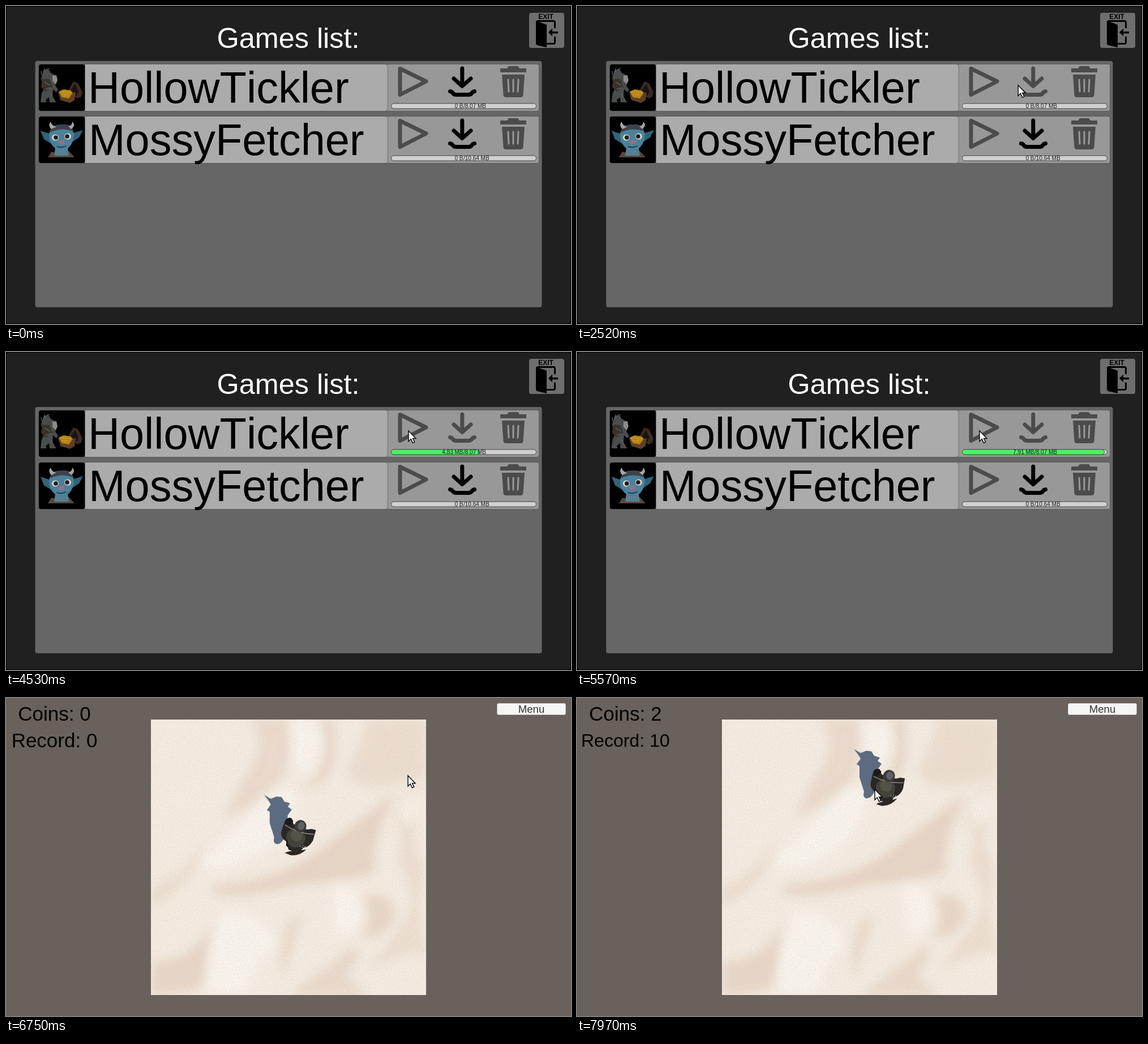
Recreate the animation shown at these times as an HTML page. Size 998 by 561 pixels, loop 7990 ms.

```html
<!DOCTYPE html>
<html lang="en">
<head>
<meta charset="utf-8">
<title>Games list</title>
<style>
  html, body { margin: 0; width: 100%; height: 100%; overflow: hidden; background: #000; }
  svg { display: block; width: 100%; height: 100%; }
  text { font-family: "Liberation Sans", Arial, sans-serif; font-kerning: none; }
  .mid { text-anchor: middle; }
  .small { font-size: 10px; fill: #1c1c1c; }
  .line { fill: none; stroke: #000; stroke-linecap: round; stroke-linejoin: round; }
</style>
</head>
<body>
<svg viewBox="0 0 998 561">
  <defs>
    <filter id="soft" x="-20%" y="-20%" width="140%" height="140%"><feGaussianBlur stdDeviation="9"/></filter>
    <filter id="grain" x="0" y="0" width="100%" height="100%">
      <feTurbulence type="fractalNoise" baseFrequency=".55" numOctaves="2" seed="4"/>
      <feColorMatrix values="0 0 0 0 .62  0 0 0 0 .5  0 0 0 0 .4  1.6 0 0 0 -.66"/>
    </filter>
    <clipPath id="sandBox"><path d="M256 38h486v486H256z"/></clipPath>
  </defs>

  <g id="menu">
    <path fill="#000" d="M0 0h998v561H0z"/>
    <rect x="1" y="1" width="996" height="559" rx="4" fill="#202020"/>
    <text class="mid" x="498.500" y="74" font-size="50.400" fill="#fff">Games list:</text>
    <rect x="924" y="12" width="62" height="62" rx="4" fill="#6e6e6e"/>
    <text class="mid" x="953.500" y="22.500" font-size="12" font-weight="bold">EXIT</text>
    <path d="M936 26L955 33V73L938 69Q936 68 936 66Z"/>
    <path class="line" stroke-width="3" d="M939 26.500H967Q969.500 26.500 969.500 29V38M969.500 55V64Q969.500 66.500 967 66.500H956"/>
    <path d="M958 46.500L965 39.500V45H975V48.500H965V53.500Z"/>
    <rect x="51.500" y="97" width="895" height="434.500" rx="4" fill="#666"/>
    <g id="rows"></g>
  </g>

  <g id="game">
    <path fill="#69615b" d="M0 0h998v561H0z"/>
    <g clip-path="url(#sandBox)">
      <path fill="#f5ede4" d="M256 38h486v486H256z"/>
      <g fill="#dfc9b6" filter="url(#soft)" opacity=".8">
        <path opacity=".6" d="M430 38Q470 80 415 150L385 210Q440 195 488 142Q508 90 498 38Z"/>
        <path opacity=".8" d="M556 38Q572 80 560 115Q545 150 518 160Q568 160 580 105Q582 65 576 38Z"/>
        <path opacity=".5" d="M640 38Q625 90 600 130Q630 170 690 150L742 140V38Z"/>
        <path opacity=".8" d="M362 345Q430 353 520 328Q600 322 652 308Q640 260 690 165Q600 235 545 275Q470 325 372 330Z"/>
        <path opacity=".5" d="M350 250Q340 325 256 368V335Q320 310 350 250Z"/>
        <path opacity=".75" d="M256 465Q325 468 366 398Q358 470 345 512Q300 523 256 521Z"/>
        <path opacity=".65" d="M525 380Q475 400 490 495Q505 440 525 380Z"/>
        <path opacity=".75" d="M630 350Q690 340 686 390Q660 430 630 420Q650 385 630 350Z"/>
        <path opacity=".65" d="M500 524Q580 465 610 440Q640 440 600 490L640 524Z"/>
        <path opacity=".5" d="M742 150Q690 175 684 205Q710 240 694 290Q735 360 700 400L640 480Q710 440 742 450Q720 380 738 300Q700 250 742 150Z"/>
      </g>
      <g fill="#fbf8f2" opacity=".7" filter="url(#soft)">
        <path d="M442 195Q480 145 510 162Q520 230 440 280Q360 320 345 290Q390 240 442 195Z"/>
        <path d="M505 40H550Q565 100 530 140Q505 130 505 40Z"/>
        <path d="M385 375Q470 380 475 440Q440 460 430 520H355Q355 420 385 375Z"/>
        <path d="M575 330Q640 320 625 400Q590 440 580 400Z"/>
        <path d="M690 190Q730 150 738 170Q730 230 700 225Z"/>
      </g>
      <path filter="url(#grain)" opacity=".5" d="M256 38h486v486H256z"/>
    </g>
    <g fill="#5d6b80">
      <path id="shadowFront" d="M440 206L456 208L461 200L472 201L482 199L478 207L491 212L487 216Q493 228 503 231L510 241L498 238L485 235L490 262H467L462 236L452 236Q447 228 453 221L460 215L449 212Z"/>
      <path id="shadowSide" d="M472 136L484 143L494 139L503 140L508 148L518 151L514 157L521 162L514 172L508 212Q502 224 494 223Q487 221 490 211L482 186L482 166L477 163L484 153L479 145Z"/>
    </g>
    <g id="walker">
      <path fill="#292623" d="M490 311Q496 304 508 300L523 291Q515 308 500 311Z"/>
      <path fill="#2a2724" d="M469 258Q471 249 479 250L485 258H511L518 254L526 253L528 272Q526 286 517 290L513 303H494L484 291Q471 288 470 276Z"/>
      <ellipse cx="498" cy="279" rx="17" ry="17" fill="#45423a"/>
      <ellipse cx="498" cy="275" rx="11" ry="10" fill="#555146"/>
      <path fill="none" stroke="#8c8678" stroke-width="1.500" d="M472 265Q498 271 526 261"/>
      <path fill="#1b1a19" d="M470 254l6-4 7 3-3 9-9 1zM484 285l9 15-6-2z"/>
      <ellipse cx="498" cy="257" rx="10.500" ry="11" fill="#3c3b39"/>
      <ellipse cx="499" cy="256" rx="6" ry="7" fill="#5d6167"/>
      <path fill="none" stroke="#cfc7b5" stroke-dasharray="2 2" d="M510 290l12 1M514 287l8 0"/>
    </g>
    <g class="mid">
      <text id="coins" x="85.500" y="39.500" font-size="35"></text>
      <text id="record" x="85.500"></text>
      <rect x="867" y="9" width="122" height="21" rx="3" fill="#f5f5f5" stroke="#4f4944" stroke-width=".6"/>
      <text x="928" y="26" font-size="18.600" fill="#323232">Menu</text>
    </g>
  </g>

  <path id="cursor" fill="#fff" stroke="#111" stroke-width="1.500" d="M0 0V18.500L4.300 14.500L7.500 21.500L10.700 20L7.500 13.500H13Z"/>
</svg>

<script>
const LOOP = 7990;
const CLICK = 2150, DONE = 5650, CUT = 5980;
const $ = id => document.getElementById(id);

const goblin = `
  <path fill="#4a4d4e" d="M62 128l4-14 8-4 5 8 8 4 3 9-3 9 5 8-3 4-6-5-1 14 7 9H77l-1-9-6 5 2 4H61l2-16 4-8z"/>
  <path fill="#3a332c" d="M64 128l13 1 5 14-12 8-8-8z"/>
  <path fill="#8f8b87" d="M82 123l7-1 2 9-3 7-6-6z"/>
  <path fill="none" stroke="#737a7d" d="M63 122l-1-7M68 116l0-6M74 112l3-3M68 134l10 6M70 147l10-3M79 155l6 11"/>
  <path fill="#3c2a24" d="M109 151l10-18 8 3 8 16-2 8-7 3z"/>
  <path fill="#1a1312" d="M114 150l8-13 6 14-4 8z"/>
  <path fill="#5e4128" d="M92 151l4 15 17 5 8-5 2-14-14 3z"/>
  <path fill="#b88618" d="M93 151l9-4 12 2 4 4-7 10-12-2z"/>
  <path fill="none" stroke="#e6bd3c" stroke-dasharray="2 2" d="M96 151l18 2M99 156l12 1"/>`;

const imp = `
  <path fill="#5a463e" d="M74 267l6-10 16 4 15-5 10 11z"/>
  <path fill="#567f92" d="M87 250h22l2 14H85z"/>
  <path fill="#33627a" d="M79 226L61 220L67 235L80 243ZM116 225L136 219L129 232L115 241Z"/>
  <path fill="#4b819a" d="M76 226Q78 212 98 213Q118 212 120 226Q119 246 106 253Q98 256 90 253Q76 245 76 226Z"/>
  <path fill="#3d424c" d="M77 223Q80 208 98 209Q115 207 119 221Q98 213 77 223Z"/>
  <path fill="#a5a5a3" d="M80 217Q73 210 79 204Q81 212 89 213ZM110 212Q117 211 117 204Q124 211 115 217Z"/>
  <g fill="#d5d6d2"><ellipse cx="87" cy="232" rx="6" ry="5.500"/><ellipse cx="109" cy="230" rx="6" ry="5.500"/></g>
  <g fill="#241b18"><circle cx="88" cy="232" r="3.800"/><circle cx="108" cy="230" r="3.800"/></g>
  <ellipse cx="98" cy="240" rx="6" ry="4" fill="#8d7389"/>
  <path class="line" stroke="#2f4d62" d="M90 248Q98 251 106 247"/>`;

// Second row repeats the first one 92 px lower.
const row = (id, dy, name, nameX, total, picture) => `
  <g transform="translate(0 ${dy})">
    <rect x="57" y="102" width="885" height="84" rx="4" fill="#5c5c5c"/>
    <rect x="139" y="103" width="534" height="82" rx="3" fill="#ababab"/>
    <rect x="673" y="103" width="4" height="82" fill="#8d8d8d"/>
    <rect x="676" y="103" width="265" height="82" rx="3" fill="#989898"/>
    <rect x="58" y="103" width="81.500" height="82" rx="4"/>
    <g transform="translate(0 ${-dy})">${picture}</g>
    <text x="${nameX}" y="171" font-size="77.500">${name}</text>
    <path id="${id}Play" class="line" stroke-width="7" opacity=".5" d="M696 110.500L742 133L696 156.500Z"/>
    <g id="${id}Load">
      <path class="line" stroke-width="7" d="M805.800 110V140M791 128L805.800 141.500L821 128M784.500 150.500C790 151 788 156.500 795 156.500H817C824 156.500 822 151 827.500 150.500"/>
    </g>
    <g id="${id}Trash" opacity=".5">
      <path d="M873 110H885L888 106H904L907 110H919V117H873ZM876 121H916L913.500 157Q913 161 909 161H883Q879 161 878.500 157Z"/>
      <path class="line" style="stroke:#989898" stroke-width="3" d="M887 130L888 151M896 130V151M905 130L904 151"/>
    </g>
    <rect x="680.500" y="172" width="256" height="9" rx="4.500" fill="#d0d0d0" stroke="#444"/>
    <rect id="${id}Fill" x="680.500" y="172" height="9" rx="4.500" fill="#4cf164" stroke="#2a6a34"/>
    <text id="${id}Got" class="small" x="807.500" y="180" text-anchor="end">0 B</text>
    <text class="small" x="808" y="180">/${total} MB</text>
  </g>`;

$('rows').innerHTML =
  row('a', 0, 'HollowTickler', 145, '8.07', goblin) +
  row('b', 92, 'MossyFetcher', 146, '10.64', imp);

// Tables of [time, ...values].
const pointer = [
  [470, 597, 243], [670, 597, 243], [1370, 777, 149], [1500, 777, 149], [1800, 800, 138],
  [2250, 800, 138], [3050, 722, 145], [3550, 720, 143], [3800, 711, 139], [5980, 711, 139],
  [6290, 710, 137], [6950, 710, 137], [7270, 678, 161], [7600, 542, 164], [7970, 526, 161]
];
const megabytes = [[2600, 0], [3550, 2.47], [3830, 3.25], [4670, 5.14], [5470, 7.29], [5570, 7.91], [DONE, 8.07]];
const walk = [[6310, 0, 0], [7270, 30, -70], [7970, 47, -120]];
const turn = [[6310, 0], [6650, 20], [7270, 20], [7970, 16]];

const linear = k => k;
const smooth = k => k * k * (3 - 2 * k);

function sample(table, t, ease = linear) {
  if (t <= table[0][0]) return table[0].slice(1);
  const i = table.findIndex(step => step[0] > t);
  if (i < 0) return table[table.length - 1].slice(1);
  const from = table[i - 1], to = table[i];
  const k = ease((t - from[0]) / (to[0] - from[0]));
  return from.slice(1).map((v, n) => v + (to[n + 1] - v) * k);
}

const set = (id, name, value) => $(id).setAttribute(name, value);
const show = (id, on) => set(id, 'visibility', on ? 'visible' : 'hidden');
const fade = (t, start) => Math.min(1, Math.max(0, (t - start) / 100));

function drawMenu(t) {
  const [got] = sample(megabytes, t);
  set('aLoad', 'opacity', 1 - fade(t, CLICK) / 2);
  set('aPlay', 'opacity', .5 + fade(t, DONE - 40) / 2);
  set('aTrash', 'opacity', .5 + fade(t, DONE - 40) / 2);
  set('aFill', 'width', 8 + 248 * got / 8.07);
  show('aFill', got > 0);
  show('bFill', false);
  $('aGot').textContent = got ? got.toFixed(2) + ' MB' : '0 B';
}

function drawGame(t) {
  const [x, y] = sample(walk, t);
  const [angle] = sample(turn, t, smooth);
  const sway = t > 6310 ? 2 * Math.sin((t - 7270) / 110) : 0;
  const side = t > 6480;
  set('walker', 'transform', `translate(${x} ${y}) rotate(${angle + sway} 498.5 279)`);
  set('shadowFront', 'transform', `translate(${x} ${y})`);
  set('shadowSide', 'transform', `translate(${x - 30} ${(y + 70) * .92})`);
  show('shadowFront', !side);
  show('shadowSide', side);
  $('coins').textContent = 'Coins: ' + (t < 7690 ? 0 : t < 7880 ? 1 : 2);
  const scored = t >= 7500;
  $('record').textContent = 'Record: ' + (scored ? 10 : 0);
  set('record', 'font-size', scored ? 32 : 35);
  set('record', 'y', scored ? 85.5 : 86.5);
}

function draw(t) {
  const playing = t >= CUT;
  $('menu').style.display = playing ? 'none' : '';
  $('game').style.display = playing ? '' : 'none';
  if (playing) {
    drawGame(t);
  } else {
    show('shadowFront', false);
    show('shadowSide', false);
    drawMenu(t);
  }
  show('cursor', t >= 470);
  set('cursor', 'transform', `translate(${sample(pointer, t, smooth)})`);
}

const start = performance.now();
function tick() {
  draw((performance.now() - start) % LOOP);
  requestAnimationFrame(tick);
}
tick();
</script>
</body>
</html>
```
